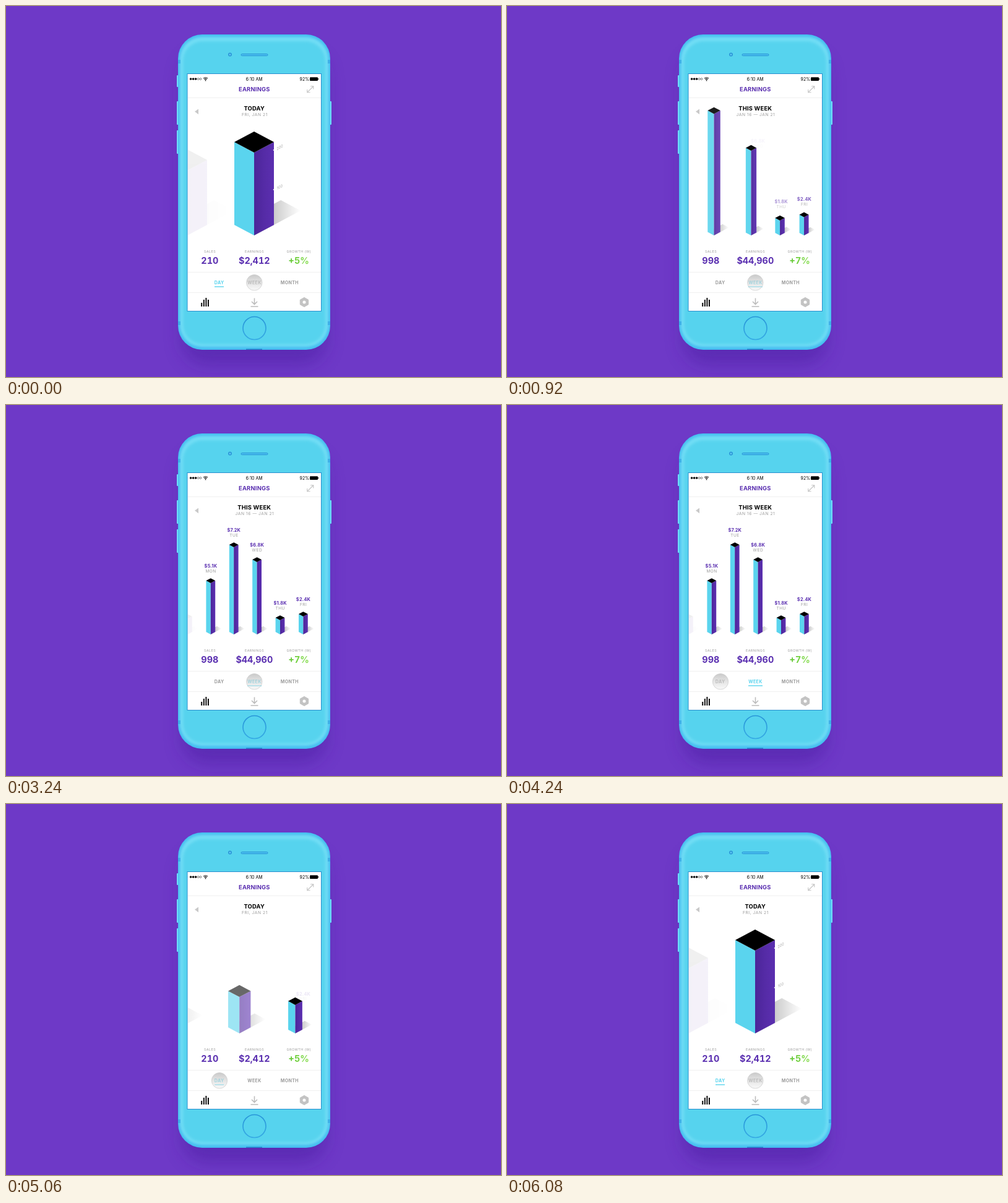
An HTML page for the animation above (6.1 s loop, 800x600 px).

```html
<!DOCTYPE html>
<html lang="en">
<head>
<meta charset="utf-8">
<title>Earnings chart</title>
<style>
  html, body { margin: 0; width: 100%; height: 100%; overflow: hidden; background: #6e39c7; }
  svg { display: block; width: 800px; height: 600px; }
  text { font-family: Inter, Roboto, "Liberation Sans", sans-serif; text-anchor: middle; }
  .num { font-variant-numeric: tabular-nums; }
</style>
</head>
<body>
<svg id="stage" viewBox="0 0 800 600" xmlns="http://www.w3.org/2000/svg">
  <defs>
    <linearGradient id="side"><stop stop-color="#4b2599"/><stop offset=".5" stop-color="#552ba6"/><stop offset="1" stop-color="#5b2fb0"/></linearGradient>
    <linearGradient id="cast"><stop stop-opacity=".26"/><stop offset=".43" stop-opacity=".2"/><stop offset="1" stop-opacity="0"/></linearGradient>
    <linearGradient id="green"><stop stop-color="#5fc62f"/><stop offset="1" stop-color="#8fe05a"/></linearGradient>
    <linearGradient id="touch" x2="0" y2="1"><stop stop-color="#b4b4b4" stop-opacity=".72"/><stop offset="1" stop-color="#f2f2f2" stop-opacity=".5"/></linearGradient>
    <linearGradient id="ring" x2="0" y2="1"><stop stop-color="#2795d8"/><stop offset="1" stop-color="#35a9e4"/></linearGradient>
    <filter id="blur2" x="-10%" y="-10%" width="120%" height="120%"><feGaussianBlur stdDeviation="2"/></filter>
    <filter id="blur14" x="-30%" y="-30%" width="160%" height="160%"><feGaussianBlur stdDeviation="14"/></filter>
    <clipPath id="bodyClip"><rect x="278" y="46" width="246" height="510" rx="39"/></clipPath>
    <clipPath id="chartClip"><rect x="294" y="149" width="214.5" height="240"/></clipPath>
  </defs>
  <rect width="800" height="600" fill="#6e39c7"/>
  <g id="phone">
    <rect x="284" y="76" width="234" height="504" rx="40" fill="#4a1fa0" opacity=".5" filter="url(#blur14)"/>
    <g fill="#6fdcf8">
      <rect x="276" y="112" width="4" height="19" rx="1"/>
      <rect x="276" y="154" width="4" height="38" rx="1"/>
      <rect x="276" y="201" width="4" height="38" rx="1"/>
      <rect x="522" y="154" width="4" height="38" rx="1"/>
    </g>
    <g clip-path="url(#bodyClip)">
      <rect x="278" y="46" width="246" height="510" fill="#45bdf0"/>
      <rect x="281" y="50" width="240" height="501" rx="36" fill="#72def5" filter="url(#blur2)"/>
      <rect x="286" y="57" width="230" height="490" rx="32" fill="#56d3ee" filter="url(#blur2)"/>
      <path d="M278 90h4M520 90h4M278 513h4M520 513h4" stroke="#2f9be0" stroke-width="6" opacity=".55"/>
    </g>
    <rect x="388" y="554.5" width="26" height="1.5" fill="#2285cc"/>
    <circle cx="362" cy="78.5" r="2.3" fill="#5cc8f2" stroke="#2a93d6" stroke-width="1.4"/>
    <rect x="380" y="77.5" width="43" height="3" rx="1.5" fill="#48bfee" stroke="#2a93d6"/>
    <circle cx="401.5" cy="521" r="18.5" fill="#56d3ee" stroke="url(#ring)" stroke-width="1.7"/>
    <rect x="293" y="109.5" width="216.5" height="384" fill="#fff" stroke="#2a8fce"/>
  </g>
  <g id="statusBar">
    <circle cx="298.6" cy="118" r="1.8"/><circle cx="302.6" cy="118" r="1.8"/><circle cx="306.6" cy="118" r="1.8"/>
    <g fill="none" stroke="#000" stroke-width=".5"><circle cx="310.6" cy="118" r="1.5"/><circle cx="314.4" cy="118" r="1.5"/></g>
    <path d="M319 117.2a5 5 0 0 1 7 0M320.5 118.9a2.9 2.9 0 0 1 4 0" fill="none" stroke="#000" stroke-width="1.1"/>
    <circle cx="322.5" cy="120.4" r=".9"/>
    <rect x="491" y="115.3" width="13" height="5.6" rx="1"/><rect x="504.4" y="117" width="1" height="2.2"/>
  </g>
  <path d="M294 148.5h215M294 430.5h215M294 463.5h215" stroke="#f0f0f0"/>
  <path d="M305 170.8l6-4.4v8.8z" fill="#c9c9c9"/>
  <path d="M487 139.6l9.6-9.6M492.2 129.8h4.6v4.6M486.8 135v4.8h4.8" fill="none" stroke="#c2c2c2" stroke-width="1.1"/>
  <path d="M316.2 480v6M319.8 475v11M323.4 472v14M327 475v11" stroke="#111" stroke-width="2"/>
  <path d="M401.5 472.5v9.5M397 478l4.5 4.5 4.5-4.5M395.5 486h12" fill="none" stroke="#bcbcbc" stroke-width="1.6"/>
  <path d="M482 471.4l6.7 3.8v7.6l-6.7 3.8-6.7-3.8v-7.6z" fill="#c3c3c3" stroke="#c3c3c3" stroke-linejoin="round"/>
  <circle cx="482" cy="479" r="2.5" fill="#fff"/>
  <g id="chart" clip-path="url(#chartClip)"></g>
  <g id="copy"></g>
  <rect id="underline" y="453.3" height="1.4" fill="#5ad4ee"/>
  <circle id="cursor" r="12.7" fill="url(#touch)" stroke="#cfcfcf" stroke-width=".8"/>
</svg>
<script>
const LOOP = 6100, BASE = 371, SLOPE = 0.53;
const PURPLE = '#5a2fb0', GRAY = '#9c9c9c';
const $ = id => document.getElementById(id);
const clamp = v => Math.min(1, Math.max(0, v));
const lerp = (a, b, p) => a + (b - a) * p;
const ramp = (t, start, dur) => clamp((t - start) / dur);
const easeOut = (t, start, dur) => 1 - (1 - ramp(t, start, dur)) ** 3;
const easeInOut = (t, start, dur) => { const u = ramp(t, start, dur); return u * u * u * (u * (u * 6 - 15) + 10); };
const returning = t => t > 4000;

function add(parent, tag, attrs, content = '') {
  const el = document.createElementNS('http://www.w3.org/2000/svg', tag);
  for (const key in attrs) el.setAttribute(key, attrs[key]);
  el.textContent = content;
  parent.appendChild(el);
  return el;
}

// Text centred on (x, cy).
function label(parent, x, cy, size, weight, fill, content, spacing = 0) {
  return add(parent, 'text', {
    x: x + spacing / 2, y: cy + size * 0.363, fill,
    'font-size': size, 'font-weight': weight, 'letter-spacing': spacing
  }, content);
}

function showSliding(el, opacity) {
  el.setAttribute('opacity', opacity);
  el.setAttribute('transform', `translate(0 ${-8 * (1 - opacity)})`);
}

// Positions and body heights go from the wide day layout to the narrow week layout.
const bars = [
  { day: 'SUN', slot: -1, tall: 25, start: 800, dur: 390 },
  { day: 'MON', price: '$5.1K', slot: 0, tall: 83, start: 760, dur: 390 },
  { day: 'TUE', price: '$7.2K', slot: 1, tall: 141, start: 720, dur: 392 },
  { day: 'WED', price: '$6.8K', slot: 2, tall: 117, start: 680, dur: 382 },
  { day: 'THU', price: '$1.8K', slot: 3, tall: 23, tallDay: 105, start: 603, dur: 415 },
  { day: 'FRI', price: '$2.4K', slot: 4, tall: 29, tallDay: 134, start: 610, dur: 370 }
];
const chart = $('chart'), copy = $('copy');

for (const bar of bars) {
  bar.weekX = 330.8 + bar.slot * 37.4;
  bar.dayX = 401 - (4 - bar.slot) * 108;
  bar.tallDay = bar.tallDay || bar.tall * 4.4;
  bar.group = add(chart, 'g', {});
  [bar.cast, bar.left, bar.right, bar.top] =
    ['url(#cast)', '#5ad4ee', 'url(#side)', '#000'].map(fill => add(bar.group, 'polygon', { fill }));
  if (bar.price) {
    const top = BASE - bar.tall - 8;
    bar.tag = add(copy, 'g', {});
    label(bar.tag, bar.weekX, top - 20, 7.4, 700, PURPLE, bar.price, 0.2);
    label(bar.tag, bar.weekX, top - 11.8, 6.5, 400, GRAY, bar.day, 0.5);
  }
}

function weekness(bar, t) {
  return returning(t)
    ? 1 - easeOut(t, 4850 + 47 * bar.slot, 400)
    : easeOut(t, bar.start, bar.dur);
}

function drawBar(bar, t) {
  const p = weekness(bar, t);
  const x = lerp(bar.dayX, bar.weekX, p), half = lerp(32, 7.4, p), tall = lerp(bar.tallDay, bar.tall, p);
  const rise = half * SLOPE, front = BASE - tall;
  const set = (el, points) => el.setAttribute('points', points.join(' '));
  const at = (u, v) => [x + u * half, BASE + v * half];
  set(bar.cast, [at(0, 0), at(2.35, -1.25), at(1.35, -1.78), at(0, -1.06)]);
  set(bar.left, [[x - half, front - rise], [x, front], [x, BASE], [x - half, BASE - rise]]);
  set(bar.right, [[x, front], [x + half, front - rise], [x + half, BASE - rise], [x, BASE]]);
  set(bar.top, [[x, front - 2 * rise], [x + half, front - rise], [x, front], [x - half, front - rise]]);
  const opacity = bar.slot === 4 ? 1 : bar.slot < 0 ? 0.06 : lerp(0.06, 1, p);
  bar.group.setAttribute('opacity', opacity);
  if (bar.tag) {
    showSliding(bar.tag, returning(t)
      ? 1 - ramp(t, 4780 + 47 * bar.slot, 105)
      : easeOut(t, 800 + 58 * (4 - bar.slot), 300));
  }
}

const axis = add(copy, 'g', {});
[['200', 233], ['100', 297]].forEach(([value, y]) => {
  add(axis, 'rect', { x: 431.8, y: y - 0.8, width: 2.2, height: 1.6, fill: '#fff' });
  const g = add(axis, 'g', { transform: `translate(442.5 ${y - 4.5}) rotate(-28) skewX(-20)` });
  label(g, 0, 0, 6, 400, '#a8a8a8', value, 0.2);
});

label(copy, 401.2, 118, 7, 400, '#000', '6:10 AM', 0);
label(copy, 482.3, 118, 7, 400, '#000', '92%', 0);
label(copy, 401.2, 135, 9.4, 700, PURPLE, 'EARNINGS', 0.2);

function heading(title, subtitle) {
  const g = add(copy, 'g', {});
  label(g, 401.2, 165.2, 9.4, 700, '#000', title, 0.2);
  label(g, 401.7, 175.2, 6.7, 400, GRAY, subtitle, 0.55);
  return g;
}
const todayHead = heading('TODAY', 'FRI, JAN 21');
const weekHead = heading('THIS WEEK', 'JAN 16 — JAN 21');

const stats = [
  ['SALES', 329.3, '210', '998', PURPLE],
  ['EARNINGS', 401.3, '$2,412', '$44,960', PURPLE],
  ['GROWTH (W)', 473.2, '+5%', '+7%', 'url(#green)']
].map(([name, x, day, week, fill]) => {
  label(copy, x, 397.3, 5.4, 400, GRAY, name, 0.45);
  const el = label(copy, x, 411.6, 14.4, 700, fill, day);
  el.setAttribute('class', 'num');
  return { el, day, week };
});

const [dayTab, weekTab] = [['DAY', 344.5], ['WEEK', 401.3], ['MONTH', 458.2]]
  .map(([name, x]) => label(copy, x, 447.5, 7.1, 700, GRAY, name, 0.3));
const tabColor = p => `rgb(${lerp(156, 90, p)},${lerp(156, 212, p)},${lerp(156, 238, p)})`;

function press(t, start) {
  return Math.sin(Math.PI * ramp(t, start, 220));
}

function render(t) {
  for (const bar of bars) drawBar(bar, t);
  const back = returning(t);

  axis.setAttribute('opacity', back ? ramp(t, 5380, 180) : 1 - ramp(t, 600, 60));
  showSliding(weekHead, back ? 1 - ramp(t, 4760, 150) : easeOut(t, 600, 250));
  showSliding(todayHead, back ? easeOut(t, 4780, 250) : 1 - ramp(t, 600, 170));

  const showWeek = t >= 610 && t < 4760;
  for (const s of stats) s.el.textContent = showWeek ? s.week : s.day;

  const tab = back ? 1 - easeOut(t, 4750, 370) : easeOut(t, 610, 370);
  dayTab.setAttribute('fill', tabColor(1 - tab));
  weekTab.setAttribute('fill', tabColor(tab));
  $('underline').setAttribute('x', lerp(337, 390, tab));
  $('underline').setAttribute('width', lerp(15, 23, tab));

  const toDay = easeInOut(t, 3700, 500) - easeInOut(t, 5610, 460);
  const scale = 1 - 0.08 * (press(t, 420) + press(t, 4560));
  $('cursor').setAttribute('transform', `translate(${lerp(401.3, 345, toDay)} 447.3) scale(${scale})`);
}

const begin = performance.now();
function tick() {
  render((performance.now() - begin) % LOOP);
  requestAnimationFrame(tick);
}
render(0);
requestAnimationFrame(tick);
</script>
</body>
</html>
```
